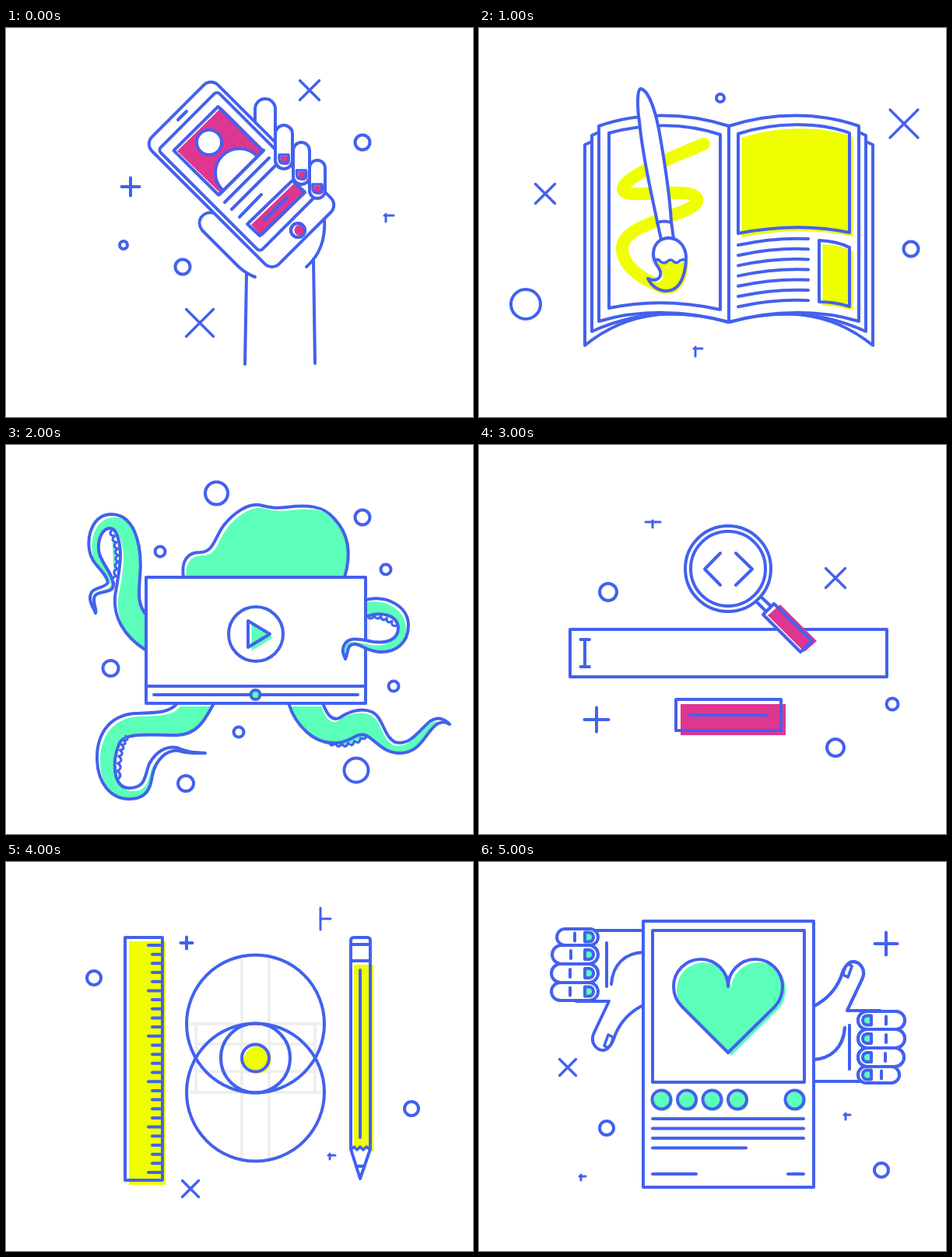
An HTML page with a canvas that plays this animation: 600 px wide and 500 px high, repeating every 6000 ms.

```html
<!DOCTYPE html>
<html lang="en">
<head>
<meta charset="utf-8">
<title>Line icons</title>
<style>
html, body { margin: 0; width: 100%; height: 100%; overflow: hidden; background: #fff; }
canvas { display: block; width: 100vw; height: 100vh; }
</style>
</head>
<body>
<canvas id="stage" width="600" height="500"></canvas>
<script>
const ctx = document.getElementById('stage').getContext('2d');
const BLUE = '#4361ee', PINK = '#de3691', YELLOW = '#efff00', GREEN = '#5cffb9', GREY = '#efefef', WHITE = '#fff';
const SCENE_MS = 1000;

function path(d, fill, stroke = BLUE, width = 4) {
  const p = d instanceof Path2D ? d : new Path2D(d);
  if (fill) { ctx.fillStyle = fill; ctx.fill(p); }
  if (stroke) { ctx.strokeStyle = stroke; ctx.lineWidth = width; ctx.stroke(p); }
}

function at(x, y, draw, angle = 0, flip = 1) {
  ctx.save();
  ctx.translate(x, y);
  ctx.rotate(angle);
  ctx.scale(flip, 1);
  draw();
  ctx.restore();
}

function clipped(d, draw) {
  ctx.save();
  ctx.clip(new Path2D(d));
  draw();
  ctx.restore();
}

// Outline whose colour sits slightly off register
function tint(d, color, dx, dy, inside) {
  path(d, WHITE, null);
  const shade = () => at(dx, dy, () => path(d, color, null));
  if (inside) clipped(d, shade); else shade();
  path(d);
}

function line(x1, y1, x2, y2, color, width) {
  path(`M${x1},${y1}L${x2},${y2}`, null, color, width);
}

function box(x1, y1, x2, y2, fill, stroke, r = 0) {
  const p = new Path2D();
  p.roundRect(x1, y1, x2 - x1, y2 - y1, r);
  path(p, fill, stroke);
}

function ring(x, y, r, fill, stroke, width) {
  const p = new Path2D();
  p.arc(x, y, r, 0, Math.PI * 2);
  path(p, fill, stroke, width);
}

function plus(x, y, r) {
  line(x - r, y, x + r, y);
  line(x, y - r, x, y + r);
}

function cross(x, y, r) {
  line(x - r, y - r, x + r, y + r, BLUE, 3.4);
  line(x - r, y + r, x + r, y - r, BLUE, 3.4);
}

// Plus sign still growing
function sprout(x, y, left, right, up, down) {
  line(x - left, y, x + right, y, BLUE, 3);
  line(x, y - up, x, y + down, BLUE, 3);
}

// Scallops along a quadratic curve
function suckers(x0, y0, cx, cy, x1, y1, n, size) {
  const point = t => [
    (1 - t) ** 2 * x0 + 2 * t * (1 - t) * cx + t * t * x1,
    (1 - t) ** 2 * y0 + 2 * t * (1 - t) * cy + t * t * y1
  ];
  let d = `M${x0},${y0}`;
  for (let i = 0; i < n; i++) {
    const [ax, ay] = point(i / n), [bx, by] = point((i + 1) / n);
    const len = Math.hypot(bx - ax, by - ay);
    const mx = (ax + bx) / 2 - (by - ay) / len * size;
    const my = (ay + by) / 2 + (bx - ax) / len * size;
    d += `Q${mx},${my} ${bx},${by}`;
  }
  path(d, GREEN, BLUE, 3);
}

function phoneInHand() {
  path('M320,135V104A13,13 0 0 1 346,104V160', WHITE);
  path('M268,238C253,234 243,248 252,260L299,307Q309,316 320,320');
  line(309, 316, 307, 432);
  line(395, 297, 397, 431);
  path('M409,245C411,274 402,293 386,307');

  at(302.5, 188.3, () => {
    box(-115.5, -60, 115.5, 60, WHITE, BLUE, 13);
    box(-98, -53.5, 87, 53.5, WHITE, BLUE, 5);
  }, Math.PI / 4);
  line(221, 118, 232, 107);

  const photo = 'M272.5,101L330,158L273,214.5L215.5,157.5Z';
  path('M277,102L333,158L277,214L220,158Z', PINK, null);
  path(photo);
  ring(261, 147, 16, WHITE);
  clipped('M200,80H400L326,162L274,214L200,260Z', () => ring(300, 186, 31, WHITE));
  path('M331,157L274,214');

  line(338, 167, 281, 224);
  line(346, 177, 290, 233);
  line(328, 214, 300, 243);
  path('M372,198L386,212L329,268L315,253Z', PINK, null);
  path('M368,196L384,211L326,267L310,252Z');
  line(361, 218, 332, 247);
  ring(375, 260, 9, WHITE);
  ring(377.5, 260, 7, PINK, null);
  ring(375, 260, 9);

  [[357, 125, 181, 11], [379.5, 147, 201, 10.5], [400, 170, 219, 10]].forEach(([x, top, end, r]) => {
    box(x - r, top, x + r, end, WHITE, BLUE, r);
    at(x, end - 13, () => {
      const nail = 'M-6,-5H6V0Q6,6 0,6Q-6,6 -6,0Z';
      at(2, 2, () => path(nail, PINK, null));
      path(nail, null, BLUE, 3.5);
    });
  });

  cross(390, 80, 12.5);
  cross(249, 379, 17.5);
  plus(160, 204, 11.5);
  ring(458, 147, 9.5);
  ring(151, 279, 5);
  ring(227, 307, 9.5);
  sprout(488, 241, 2, 10, 2, 8);
}

function bookAndBrush() {
  const leaves = () => {
    path('M145,146L136,150V408C195,360 260,361 321,378', WHITE);
    path('M154,134L145,138V390C202,364 260,361 321,378', WHITE);
    path('M321,126C265,108 205,108 154,126V377C205,362 265,362 321,378Z', WHITE);
  };
  leaves();
  at(642, 0, leaves, 0, -1);

  path('M167,135C215,122 265,122 310,137V362C265,352 215,350 167,360Z');
  path('M289,149C250,165 182,193 185,208C188,222 272,202 280,219C287,240 186,247 184,282C183,305 208,323 238,334', null, YELLOW, 16);

  const picture = 'M333,136C378,121 437,120 476,135V263C430,253 385,254 333,264Z';
  const inset = 'M437,273Q460,274 476,282V358Q457,352 437,352Z';
  [picture, inset].forEach(d => tint(d, YELLOW, 4.5, 5));
  for (let i = 0; i < 7; i++) {
    const y = 279 + i * 13.2;
    path(`M333,${y}Q380,${y - 10} 423,${y - 8}`);
  }

  const head = 'M244,270C258,270 267,283 266,298C265,320 257,338 241,338C230,338 221,331 217,322C226,327 235,322 233,313C231,306 224,302 224,291C224,278 232,270 244,270Z';
  at(-4, 2, () => path('M243,272C225,272 218,298 231,307Z', GREY, null));
  path(head, WHITE, null);
  clipped('M210,300L232,300L238,303L246,300L254,303L270,300V350H210Z', () =>
    at(3, 3, () => path(head, YELLOW, null)));
  path(head);
  path('M226,299Q230,296 233,300Q238,304 242,300Q246,296 250,300Q254,304 258,299Q261,297 265,298', null, BLUE, 3.5);
  path('M229,249C222,215 210,165 206,120C203,100 203,78 208,78C219,81 227,110 231,130C240,180 245,215 247,249L250,271Q242,268 234,272Z', WHITE);
  path('M229,250Q238,247 247,250');

  ring(310, 90, 5);
  ring(555, 284, 9.5);
  ring(60, 355, 19);
  cross(546, 123, 18);
  cross(85, 213, 12.5);
  sprout(278, 412, 2, 9, 2, 10);
}

function octopusPlayer() {
  tint('M228,170C225,150 232,138 249,138C268,137 267,120 280,103C292,88 310,75 325,77C338,80 345,82 360,80C385,77 408,77 422,95C441,115 444,140 435,170', GREEN, 4, 4, true);

  tint('M180,218C170,206 170,195 172,170C175,140 170,90 136,89C112,89 104,115 107,135C110,155 128,161 131,177C125,186 108,181 108,197C108,205 113,210 115,216C117,211 112,205 113,197C115,185 137,193 138,180C138,165 120,150 119,135C118,120 124,107 134,107C141,107 146,120 147,140C147,160 142,180 140,195C138,220 150,245 180,264Z', GREEN, 4, 4, true);
  suckers(136, 109, 152, 140, 139, 178, 8, 8);

  tint('M220,332C210,345 190,344 165,345C130,348 116,375 117,405C118,435 135,455 158,455C183,455 186,438 188,425C192,405 206,391 222,393C235,397 245,396 256,396C245,395 235,396 220,389C205,386 192,395 184,410C178,425 180,441 158,441C136,440 137,405 145,385C151,368 190,373 220,373C245,372 255,355 267,332', GREEN, 4, 4, true);
  suckers(154, 374, 142, 390, 143, 430, 7, -8);

  suckers(415, 381, 440, 390, 463, 371, 6, 8);
  tint('M363,332C372,360 395,385 425,383C445,381 450,369 462,373C475,379 485,397 507,396C535,395 540,366 555,358C561,355 565,356 570,359C562,351 555,349 545,355C532,365 520,387 500,382C485,375 485,350 470,343C455,337 440,343 428,351C418,355 412,345 407,332', GREEN, -2, 4, true);

  box(180, 170, 462, 332, WHITE);
  line(180, 310, 462, 310);
  line(190, 321, 452, 321);
  ring(320.5, 321, 6, GREEN);
  ring(321, 243, 35);
  tint('M311,226L339,243L311,260Z', GREEN, 4.5, 4.5);

  ctx.fillStyle = GREY;
  ctx.fillRect(464, 222, 4, 31);
  tint('M462,199C490,192 517,208 517,232C517,255 500,267 480,266C460,264 456,255 447,256C437,257 440,268 436,275C434,270 431,265 434,258C440,245 455,250 472,253C490,255 504,250 504,235C503,218 480,213 462,221Z', GREEN, -3, 4, true);
  suckers(464, 220, 488, 216, 502, 232, 5, 7);
  line(462, 195, 462, 246);

  [[270.5, 62, 14.5], [458, 93, 9.5], [488, 160, 6.5], [198, 137, 6.5], [134.5, 287, 10],
   [498, 310, 6.5], [299, 369, 6.5], [231, 435, 10], [450, 418, 15.5]].forEach(b => ring(...b));
}

function searchBar() {
  box(117, 237, 524, 298);
  line(136, 250, 136, 285);
  line(130.5, 250, 142, 250);
  line(130.5, 285, 142, 285);

  ring(320, 159, 55, WHITE);
  ring(320, 159, 48);
  path('M310,139L290,159.5L310,180M330,139L351,159.5L330,180');
  path('M362,195L376,208M356,201L369,214');
  const grip = 'M379,204L428,252L413,266L365,218Z';
  path(grip, WHITE, null);
  path('M387,205L434,252L418,266L371,219Z', PINK, null);
  path(grip);

  box(259, 333, 394, 373, PINK, null);
  box(253, 327, 388, 367);
  line(271, 347, 370, 347);

  sprout(223, 99, 9, 10, 2, 7);
  ring(166, 189, 11);
  ring(531, 333, 7.5);
  ring(458, 389, 11);
  cross(458, 171, 12.5);
  plus(151, 353, 15.5);
}

function designTools() {
  box(158, 102, 205, 415, YELLOW, null);
  box(153, 97, 201, 409);
  for (let i = 0; i < 26; i++) {
    const y = 107 + i * 11.68;
    line(i % 5 ? 188 : 183, y, 200, y);
  }

  [303, 338].forEach(x => line(x, 122, x, 382, GREY));
  [244, 397].forEach(x => line(x, 208, x, 296, GREY));
  [208, 296].forEach(y => line(232, y, 409, y, GREY));
  [234, 269].forEach(y => line(244, y, 397, y, GREY));
  ring(320.5, 208, 88.5);
  ring(320.5, 296, 88.5);
  ring(320.5, 252, 44.5);
  ring(320.5, 252, 17.5, WHITE, null);
  ring(323, 254.5, 17.5, YELLOW, null);
  ring(320.5, 252, 17.5);

  box(447, 132, 472, 372, YELLOW, null);
  path('M443,369L455,407L468,369Z', WHITE, null);
  path('M443,369V101Q443,97 447,97H464Q468,97 468,101V369L455,407Z');
  line(443, 106, 468, 106);
  line(443, 127, 468, 127);
  line(455, 139, 455, 354);
  path('M444,369L447,366L451,370L455,366L459,370L463,366L467,369', null, BLUE, 3.5);
  line(450, 391, 460, 391);

  ring(113, 149, 9);
  ring(521, 317, 9);
  plus(232, 104, 7.5);
  cross(237, 420, 10.5);
  sprout(404, 73, 0, 13, 14, 14);
  sprout(416, 377, 2, 7, 2, 5);
}

function thumb() {
  line(150, 88, 211, 88);
  line(164, 104, 164, 160);
  path('M170,157C172,131 188,117 211,116');
  path('M125,179H167L148,219C142,231 150,242 160,242C168,241 172,232 175,222C182,205 195,192 211,184');
  path('M166,222L172,225Q171,235 165,239L161,236Z', WHITE, BLUE, 3.5);
  [[100, 86, 107, 123], [94, 107, 131, 118], [93, 131, 155, 117], [93, 155, 178, 117]].forEach(([x, top, end, mark]) => {
    const mid = (top + end) / 2;
    box(x, top, 153, end, WHITE, BLUE, (end - top) / 2);
    line(mark, mid - 5, mark, mid + 5);
    at(136, mid, () => tint('M0,-6H6Q11,-5 11,0Q11,5 6,6H0Z', GREEN, 2, 1, true));
  });
}

function likedPost() {
  thumb();
  at(640, 370, () => at(0, 0, thumb, Math.PI));
  at(640, 370, thumb, Math.PI);
  box(211, 76, 430, 418, WHITE);
  box(223, 88, 418, 283);
  tint('M320,160A35,35 0 0 0 250,160Q250,175 261,186L320,245L380,186Q390,175 390,160A35,35 0 0 0 320,160Z', GREEN, 4, 4);

  [234.5, 267, 299.5, 332, 405.5].forEach(x => {
    ring(x + 2, 307.5, 12, GREEN, null);
    ring(x, 305.5, 12);
  });
  [[223, 417, 330], [223, 417, 342.5], [223, 417, 355], [223, 343, 367.5], [223, 279, 401], [397, 417, 401]]
    .forEach(([x1, x2, y]) => line(x1, y, x2, y));

  plus(523, 105, 14.5);
  cross(114, 264, 10.5);
  ring(164, 342, 9);
  ring(517, 396, 9);
  sprout(471, 325, 2, 6, 2, 6);
  sprout(131, 404, 2, 6, 2, 5);
}

const scenes = [phoneInHand, bookAndBrush, octopusPlayer, searchBar, designTools, likedPost];
const start = performance.now();

function frame() {
  const t = Math.max(0, performance.now() - start);
  ctx.fillStyle = WHITE;
  ctx.fillRect(0, 0, 600, 500);
  ctx.lineCap = ctx.lineJoin = 'round';
  scenes[Math.floor(t / SCENE_MS) % scenes.length]();
  requestAnimationFrame(frame);
}
frame();
</script>
</body>
</html>
```
